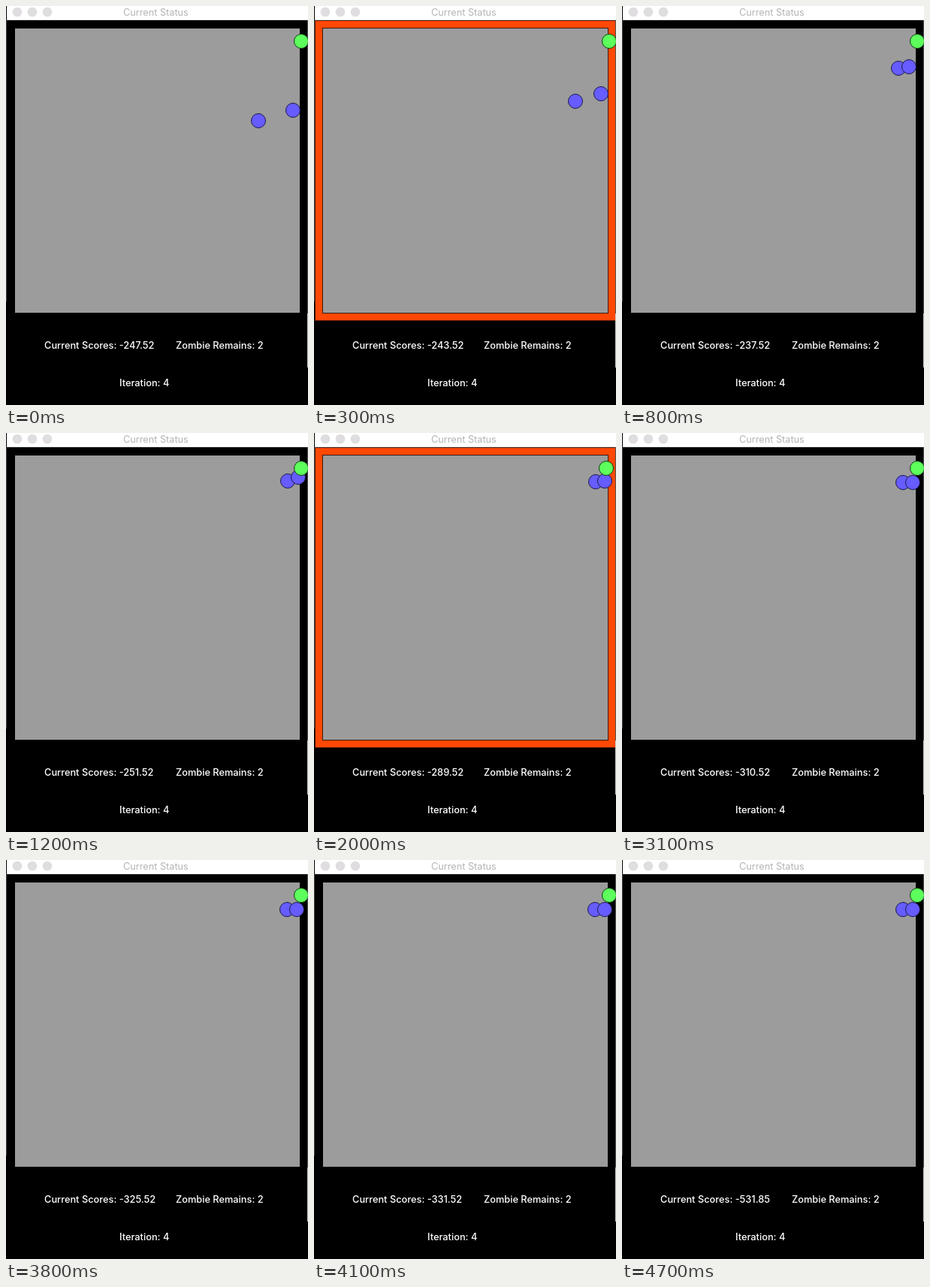
Animation of 402x532 px, one loop 5.6 s. Source, as an HTML page with a canvas:

```html
<!DOCTYPE html>
<html lang="en">
<head>
<meta charset="utf-8">
<title>Current Status</title>
<style>
  html, body { margin: 0; width: 402px; height: 532px; overflow: hidden; background: #000; }
  canvas { display: block; }
</style>
</head>
<body>
<canvas id="stage" width="402" height="532"></canvas>
<script>
const ctx = document.getElementById('stage').getContext('2d');
const LOOP = 5600, STEP = 100;

// Keyframes: time, then values
const hunterA = [[0, 336, 153], [800, 368, 83], [1200, 375, 64], [2000, 375, 65], [3100, 374, 66]];
const hunterB = [[0, 382, 139], [800, 382, 81], [1200, 389, 59], [2000, 387, 64], [3100, 387, 66]];
const player = [[0, 393, 47], [1300, 393, 47], [1700, 389, 47], [2000, 389, 47], [2300, 393, 47]];
const score = [[0, -247], [800, -237], [1200, -251], [2000, -289], [3100, -310], [3500, -322],
  [3600, -322], [3800, -325], [4100, -331]];
const hits = [300, 900, 1900, 2000, 2700, 3300, 3900];

function at(keys, t) {
  const i = keys.findIndex(k => k[0] > t);
  if (i < 0) return keys[keys.length - 1].slice(1);
  const a = keys[i - 1], b = keys[i], p = (t - a[0]) / (b[0] - a[0]);
  return a.slice(1).map((v, n) => Math.round(v + (b[n + 1] - v) * p));
}

function rect(color, x, y, w, h) {
  ctx.fillStyle = color;
  ctx.fillRect(x, y, w, h);
}

function disc(color, [x, y], r, outline) {
  ctx.beginPath();
  ctx.arc(x, y, r, 0, Math.PI * 2);
  ctx.fillStyle = color;
  ctx.fill();
  if (outline) {
    ctx.strokeStyle = outline;
    ctx.lineWidth = 1;
    ctx.stroke();
  }
}

function label(text, x, y, color = '#fff', font = '500 12.8px') {
  ctx.font = font + ' Inter, sans-serif';
  ctx.fillStyle = color;
  ctx.fillText(text, x, y);
}

function draw(t) {
  rect('#000', 0, 0, 402, 532);
  rect('#fff', 1, 0, 401, 18);
  rect('#d8dcdc', 1, 18, 401, 1);
  [15, 35, 55].forEach(x => disc('#dfdddf', [x, 8], 6.3));
  label('Current Status', 156, 13, '#b4b4b4', '400 12.7px');

  if (hits.includes(t)) {
    rect('#4a1505', 1, 19, 400, 401);
    rect('#ff4804', 2, 20, 399, 399);
    rect('#3a1c10', 11, 29, 381, 381);
  }
  rect('#9c9c9c', 12, 30, 379, 379);
  rect('#444', 0, 19, 1, 375);
  rect('#555', 401, 19, 1, 391);
  rect('#ccc', 401, 410, 1, 72);

  disc('#665cff', at(hunterA, t), 9.5, '#1c1946');
  disc('#665cff', at(hunterB, t), 9.5, '#1c1946');
  disc('#5cff5c', at(player, t), 9.5, '#123c12');

  const points = t < 4200 ? at(score, t)[0] - 0.52 : -531.85;
  label('Current Scores: ' + points.toFixed(2), 51, 457);
  label('Zombie Remains: 2', 226, 457);
  label('Iteration: 4', 151, 507);
}

function frame() {
  draw(Math.floor(performance.now() % LOOP / STEP) * STEP);
  requestAnimationFrame(frame);
}
frame();
</script>
</body>
</html>
```
